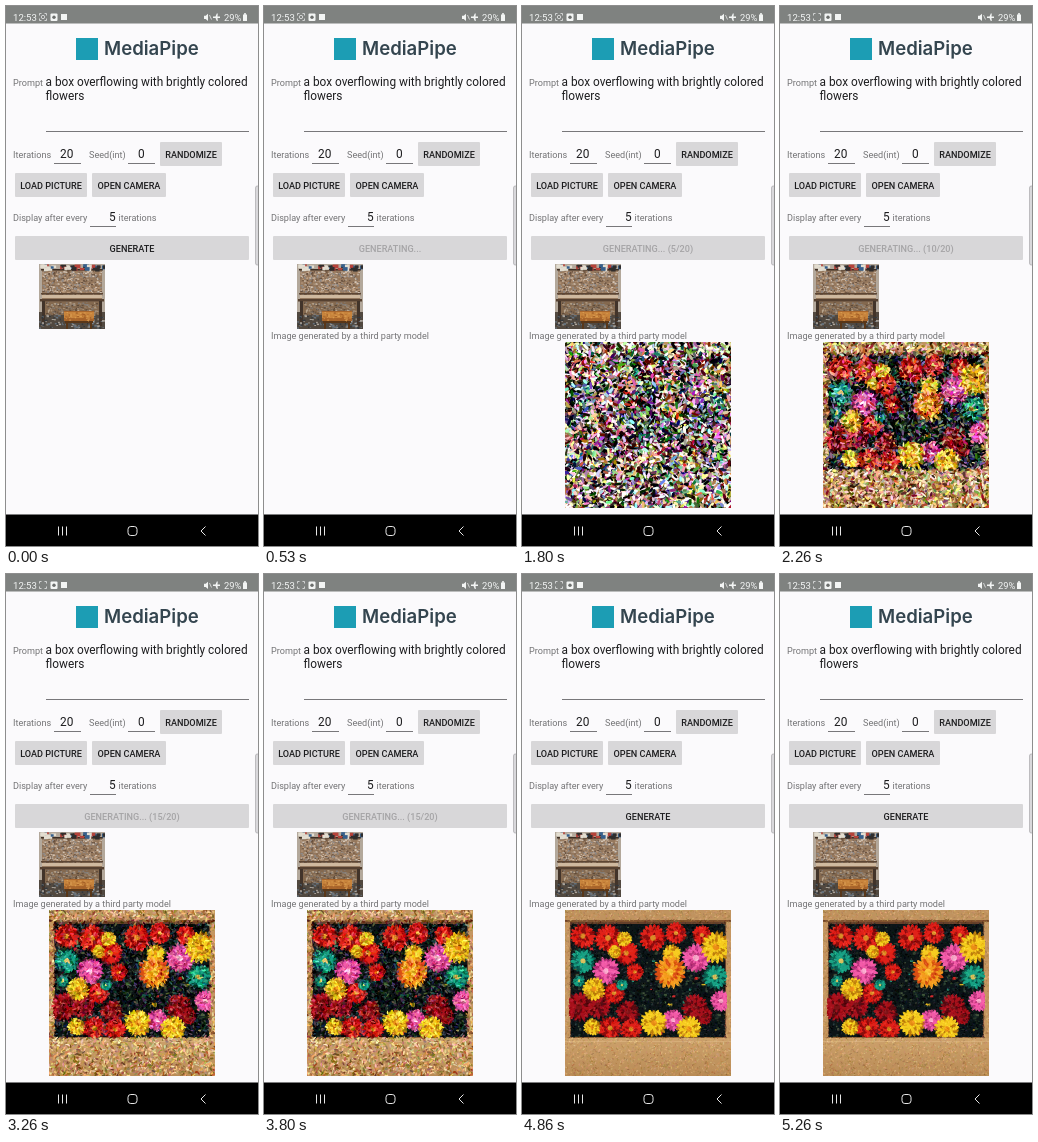
Animation of 252 by 540 pixels, one loop 5330 ms. Source, as an HTML page with a canvas:

```html
<!DOCTYPE html>
<html lang="en">
<head>
<meta charset="utf-8">
<title>Image generation demo</title>
<style>
html, body { margin: 0; width: 100%; height: 100%; overflow: hidden; background: #fbfafc; }
#stage { position: relative; width: 252px; height: 540px; overflow: hidden; }
#stage > * { position: absolute; left: 0; top: 0; }
#stage > canvas { left: 43px; top: 336px; visibility: hidden; }
#stage > #photo { left: 33px; top: 258px; visibility: visible; }
svg { font-family: Roboto, sans-serif; font-size: 9.1px; }
.label { fill: #747476; }
.field { fill: #1d1d1f; font-size: 11.85px; }
.button rect { fill: #d8d7d9; }
.button text { fill: #1d1d1f; font-weight: 500; text-anchor: middle; }
.button.off text { fill: #a5a4a6; }
.status { fill: #f3f5f4; }
.title { font: 600 18.6px Inter, sans-serif; fill: #34454f; }
</style>
</head>
<body>
<div id="stage">
<svg width="252" height="540" viewBox="0 0 252 540">
  <rect width="252" height="540" fill="#fbfafc"/>
  <rect width="252" height="17.5" fill="#7f8280"/>
  <g class="status">
    <text x="7" y="14.5" font-size="9.6">12:53</text>
    <rect x="44.500" y="7.500" width="7" height="7.500" rx="1"/>
    <circle cx="48" cy="11.300" r="1.700" fill="#6b6e6c"/>
    <rect x="55" y="8" width="6" height="6"/>
    <path d="M198 9.700h1.700l2.300-2v7.200l-2.300-2h-1.700z"/>
    <path d="M207 10.600h2.500l1.300-3h1l-.3 3h2.500v1.300h-2.500l.3 3h-1l-1.300-3h-2.500z"/>
    <text x="218" y="14.500" font-size="9.400">29%</text>
    <path d="M237 8.500h1.200V7h1.600v1.500h1.200V15h-4z"/>
  </g>
  <g fill="none" stroke="#e6e8e7" stroke-width=".8">
    <path d="M33.500 9.500v-2h2M38.500 7.500h2v2M40.500 12.500v2h-2M35.500 14.500h-2v-2M203.500 9l2 4.500"/>
    <circle id="lens" cx="37" cy="11" r="1.700"/>
  </g>

  <rect x="70" y="32" width="22" height="22" fill="#1c9db4"/>
  <text class="title" x="98" y="49">MediaPipe</text>

  <text class="label" x="7" y="80">Prompt</text>
  <text class="field" x="39.500" y="80">a box overflowing with brightly colored</text>
  <text class="field" x="39.500" y="94">flowers</text>
  <path d="M40 125.500H243M48 157.500H75M122 157.500H149M84 220.500H110" stroke="#78777a"/>

  <text class="label" x="7" y="152">Iterations</text>
  <text class="field" x="54" y="152">20</text>
  <text class="label" x="83" y="152">Seed(int)</text>
  <text class="field" x="132" y="152">0</text>
  <text class="label" x="7" y="215">Display after every</text>
  <text class="field" x="103" y="215">5</text>
  <text class="label" x="112.500" y="215">iterations</text>
  <g id="buttons"></g>
  <text id="caption" class="label" x="7" y="333">Image generated by a third party model</text>

  <path d="M253 180h-2q-1.500 0-1.500 2v75q0 2 1.500 2h2z" fill="#d9d8db" stroke="#aaa9ac" stroke-width=".7"/>
  <rect y="508.500" width="252" height="31.500"/>
  <g fill="none" stroke="#e6e6e6">
    <path d="M52.500 520.500v9M56.500 520.500v9M60.500 520.500v9M199.500 520.500l-4.500 4.500 4.500 4.500"/>
    <rect x="122" y="520.500" width="9" height="9" rx="2.800"/>
  </g>
</svg>
<canvas id="photo" width="66" height="65"></canvas>
</div>
<script>
const LOOP = 5330;
const SIZE = 166;
const byId = id => document.getElementById(id);

// start time, button label, enabled, picture index
const STEPS = [
  [0, 'GENERATE', true, -1],
  [130, 'GENERATING...', false, -1],
  [1250, 'GENERATING... (5/20)', false, 0],
  [2250, 'GENERATING... (10/20)', false, 1],
  [3250, 'GENERATING... (15/20)', false, 2],
  [4250, 'GENERATE', true, 3]
];
const LENS_TOGGLES = [600, 800, 1400, 1600, 2130, 2400, 2600, 3400, 3600, 4250, 4460, 4660, 4860, 5000, 5200];

// rest gray blend, shard contrast, shard count, shard length
const DENOISING = [[.72, 1.35, 8000, 3.6], [.12, .85, 7500, 3], [0, .5, 6500, 2.3], [0, .2, 6000, 1.4]];

function seeded(seed) {
  return () => {
    seed = (seed + 0x6D2B79F5) | 0;
    let n = Math.imul(seed ^ (seed >>> 15), 1 | seed);
    n = (n + Math.imul(n ^ (n >>> 7), 61 | n)) ^ n;
    return ((n ^ (n >>> 14)) >>> 0) / 4294967296;
  };
}

function addButton(x, y, width, label) {
  byId('buttons').insertAdjacentHTML('beforeend',
    `<g class="button"><rect x="${x}" y="${y}" width="${width}" height="24" rx="1"/>` +
    `<text x="${x + width / 2}" y="${y + 15.5}">${label}</text></g>`);
  return byId('buttons').lastElementChild;
}

function fillRects(ctx, rects) {
  for (const [color, ...box] of rects) {
    ctx.fillStyle = color;
    ctx.fillRect(...box);
  }
}

function speckle(ctx, random, count, colors, x, y, w, h, size) {
  for (let i = 0; i < count; i++) {
    ctx.fillStyle = colors[Math.floor(random() * colors.length)];
    ctx.fillRect(x + random() * w, y + random() * h, size * (.5 + random()), size * (.4 + random() * .6));
  }
}

function drawPhoto() {
  const ctx = byId('photo').getContext('2d');
  const random = seeded(4);
  fillRects(ctx, [
    ['#b3a89b', 0, 0, 66, 65], ['#51483f', 0, 48, 66, 17],
    ['#95795f', 3, 5, 60, 41], ['#3d2f25', 2, 5, 62, 1.5]
  ]);
  speckle(ctx, random, 45, ['#355f8c', '#b6423a', '#e3ddd0', '#302d2c'], 0, 0, 64, 4, 4);
  speckle(ctx, random, 750, ['#c0a286', '#69513f', '#d3c5b6', '#9a7a5c', '#8f8b8a'], 3, 7, 59, 24, 1.6);
  fillRects(ctx, [
    ['#5d4634', 2, 29, 62, 1.5], ['#cfb99f', 3, 31, 60, 3], ['#554030', 1, 35, 64, 2.5],
    ['#84694f', 6, 38, 54, 13], ['#42342a', 3, 37, 3, 25], ['#42342a', 60, 37, 3, 25]
  ]);
  speckle(ctx, random, 230, ['#98816a', '#5d4a3a', '#b9a68f', '#817c79'], 7, 38, 51, 13, 1.6);
  speckle(ctx, random, 110, ['#aaa39b', '#33383d', '#65717c'], 0, 51, 64, 13, 2);
  fillRects(ctx, [
    ['#a9662c', 25, 47, 30, 10], ['#c8843c', 25, 48, 30, 6],
    ['#593719', 26, 57, 28, 2], ['#593719', 27, 58, 2, 7], ['#593719', 51, 58, 2, 7]
  ]);
  speckle(ctx, random, 60, ['#d99b50', '#a56128'], 25, 48, 28, 8, 1.6);
}

// petal color, shade color, heart color, then [x, y, radius] for each bloom
const BLOOMS = [
  ['#a8121d', '#5a0a12', '#7d1417', [14, 97, 15], [33, 95, 14], [130, 97, 13], [63, 102, 12], [139, 106, 9]],
  ['#e0221a', '#8c0e0e', '#d98a27', [18, 26, 13], [43, 28, 14], [61, 43, 13], [88, 28, 14], [111, 23, 11], [137, 25, 10], [70, 62, 9], [49, 83, 11], [45, 118, 12], [66, 119, 11]],
  ['#19a184', '#0b5b4f', '#d7c15d', [18, 51, 13], [150, 67, 13], [57, 75, 6], [14, 71, 6]],
  ['#f35ba9', '#bb347c', '#f9a5c8', [41, 61, 14], [131, 48, 15], [156, 91, 11], [108, 110, 11]],
  ['#f6cc20', '#bd7d0d', '#e98f17', [59, 29, 8], [50, 42, 7], [107, 44, 10], [151, 37, 16], [29, 79, 12], [89, 113, 14], [124, 119, 13], [27, 117, 9]],
  ['#f39a20', '#d94f14', '#fac53a', [105, 62, 17]]
];

function drawBloom(ctx, random, [petal, shade, heart], [x, y, radius]) {
  ctx.save();
  ctx.translate(x, y);
  ctx.rotate(random() * 6);
  for (let ring = 0; ring < 4; ring++) {
    const reach = radius * (1 - ring * .2);
    const petals = 19 - ring * 3;
    for (let i = 0; i < petals; i++) {
      ctx.rotate(Math.PI * 2 / petals);
      ctx.fillStyle = random() < .68 ? petal : shade;
      ctx.beginPath();
      ctx.ellipse(reach * .6, 0, reach * (.3 + random() * .15), reach * .1 + .5, 0, 0, 7);
      ctx.fill();
    }
  }
  ctx.fillStyle = heart;
  ctx.beginPath();
  ctx.arc(0, 0, radius * .2, 0, 7);
  ctx.fill();
  ctx.restore();
}

function drawBox(ctx) {
  const random = seeded(21);
  fillRects(ctx, [
    ['#c0935f', 0, 0, SIZE, SIZE], ['#65402a', 5, 10, 156, 118], ['#0c1517', 6, 14, 154, 114]
  ]);
  speckle(ctx, random, 900, ['#28382a', '#06090b', '#1c2e2c', '#43543c', '#10191c'], 7, 15, 150, 111, 2.2);
  speckle(ctx, random, 60, ['#e6bd24', '#cf2b2d', '#239276'], 9, 20, 145, 103, 3);
  for (const group of BLOOMS)
    for (const spot of group.slice(3)) drawBloom(ctx, random, group, spot);
  const front = ctx.createLinearGradient(0, 127, 0, SIZE);
  front.addColorStop(0, '#cda26c');
  front.addColorStop(1, '#b98b56');
  fillRects(ctx, [
    [front, 0, 128, SIZE, 38], ['#8f6238', 0, 127, SIZE, 1], ['#d7ae79', 0, 131, SIZE, 1],
    ['#c59762', 0, 10, 4, 118], ['#c59762', 162, 10, 4, 118], ['#80532f', 0, 10, SIZE, 2]
  ]);
}

// Repaints the picture as slanted shards, each lightened, darkened and tinted at random.
function addNoise(ctx, gray, contrast, count, length) {
  const random = seeded(77);
  const spread = range => (random() - .5) * range * contrast;
  const pixels = ctx.getImageData(0, 0, SIZE, SIZE).data;
  for (let i = 0; i < count; i++) {
    const x = random() * SIZE, y = random() * SIZE;
    const at = 4 * (Math.floor(y) * SIZE + Math.floor(x));
    const light = spread(270);
    const color = [0, 1, 2].map(k =>
      Math.round(pixels[at + k] * (1 - gray) + 128 * gray + light + spread(130)));
    ctx.fillStyle = `rgb(${color})`;
    ctx.beginPath();
    ctx.ellipse(x, y, length * (.5 + random() * .6), length * (.25 + random() * .2), random() * Math.PI, 0, 7);
    ctx.fill();
  }
}

function makePicture(noise) {
  const canvas = document.createElement('canvas');
  canvas.width = canvas.height = SIZE;
  const ctx = canvas.getContext('2d');
  drawBox(ctx);
  addNoise(ctx, ...noise);
  byId('stage').append(canvas);
  return canvas;
}

addButton(154, 136, 62, 'RANDOMIZE');
addButton(9, 167, 72, 'LOAD PICTURE');
addButton(86, 167, 74, 'OPEN CAMERA');
const generate = addButton(9, 230, 234, 'GENERATE');
drawPhoto();
const pictures = DENOISING.map(makePicture);

const start = performance.now();
function render() {
  const time = (performance.now() - start) % LOOP;
  const [from, label, enabled, picture] = STEPS.filter(step => step[0] <= time).pop();
  generate.lastElementChild.textContent = label;
  generate.classList.toggle('off', !enabled);
  byId('caption').style.visibility = from ? 'visible' : 'hidden';
  pictures.forEach((canvas, i) => canvas.style.visibility = i === picture ? 'visible' : 'hidden');
  const lensOff = LENS_TOGGLES.filter(at => at <= time).length % 2;
  byId('lens').style.visibility = lensOff ? 'hidden' : 'visible';
  requestAnimationFrame(render);
}
render();
</script>
</body>
</html>
```
